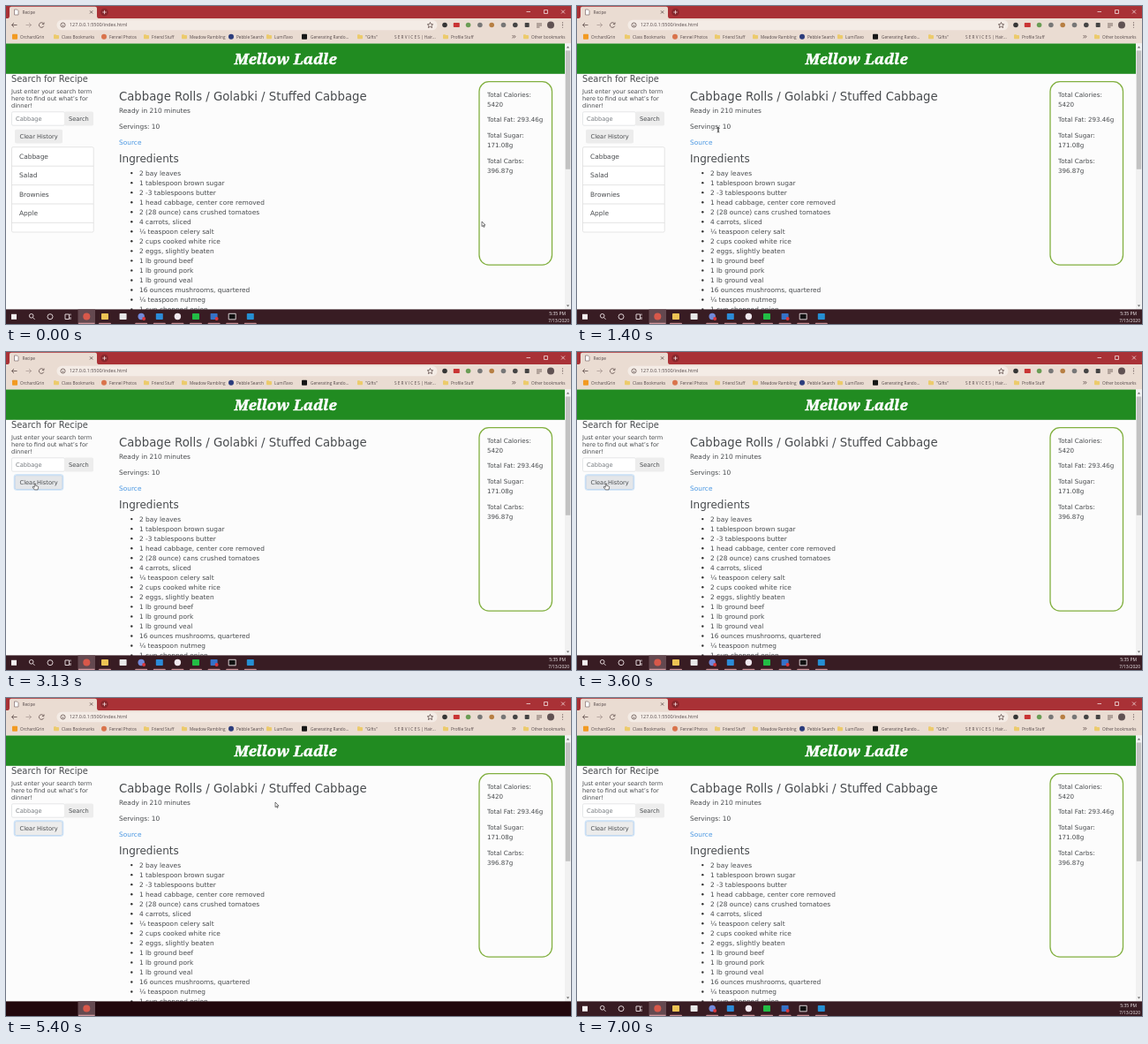
Animation of 640x360 px, one loop 7060 ms. Source, as an HTML page:

```html
<!DOCTYPE html>
<html lang="en">
<head>
<meta charset="utf-8">
<title>Recipe</title>
<style>
  html, body { margin: 0; width: 100%; height: 100%; overflow: hidden; background: #fcfcfc; }
  svg { display: block; width: 640px; height: 360px; }
  text { font-family: "DejaVu Sans", Inter, sans-serif; fill: #484b4e; white-space: pre; }
  .body { font-size: 7.42px; }
  .small { font-size: 6.65px; }
  .fact { font-size: 7.1px; }
  .title { font-size: 13.25px; }
  .sub { font-size: 12px; }
  .side { font-size: 9.9px; }
  .brand { font: italic 700 17px "Noto Serif", serif; fill: #fff; stroke: #fff; stroke-width: .5; stroke-linejoin: round; }
  .ui text { font-family: "Open Sans", "Noto Sans", sans-serif; font-size: 4.7px; fill: #55494a; }
  .ui .url { font-size: 5.4px; }
  .ui .clock { fill: #f4eef0; font-size: 5px; text-anchor: end; }
  .line { fill: none; stroke: #6d5c59; stroke-width: .9; }
  .tray { fill: none; stroke: #f0e6e8; stroke-width: .9; }
</style>
</head>
<body>
<svg viewBox="0 0 640 360">
  <rect width="640" height="360" fill="#fcfcfc"/>

  <!-- page -->
  <rect y="42.3" width="633" height="34.5" fill="#218b21"/>
  <text class="brand" x="316.5" y="66" text-anchor="middle">Mellow Ladle</text>
  <g id="copy"></g>

  <rect x="6.5" y="119.8" width="60" height="15.4" rx="1.5" fill="#fff" stroke="#dfe1e3" stroke-width=".8"/>
  <rect x="66" y="119.5" width="33" height="16" rx="1.5" fill="#ededed"/>
  <text class="small" x="11" y="130" style="fill:#757a7f">Cabbage</text>
  <text class="small" x="71" y="130">Search</text>

  <rect id="glow" x="9.2" y="138.7" width="55.6" height="17.6" rx="2.3" fill="none"/>
  <rect id="clear" x="10" y="139.7" width="54" height="15.8" rx="1.8" fill="#ececec" stroke-width=".6"/>
  <text class="small" x="15.5" y="150">Clear History</text>

  <g id="history">
    <rect x="6.5" y="159.7" width="92.7" height="96.3" rx="1.5" fill="#fff" stroke="#dedede" stroke-width=".8"/>
    <path d="M6.5 181.2h92.7m-92.7 21.4h92.7m-92.7 21.4h92.7m-92.7 21.4h92.7" stroke="#dedede" stroke-width=".8"/>
  </g>

  <rect id="facts" x="536" y="85.7" width="82.5" height="207.4" rx="11" fill="#fcfcfc" stroke-width="1.3"/>
  <g id="totals"></g>

  <rect x="633" y="42.3" width="7" height="301.5" fill="#f1f1f1"/>
  <rect x="633.8" y="50.5" width="5.4" height="134.3" fill="#c2c2c2"/>
  <path d="M634.8 47.5l1.7-2 1.7 2zM634.8 338.5l1.7 2 1.7-2z" fill="#666"/>

  <!-- browser window -->
  <g class="ui">
    <rect width="640" height="14" fill="#a93136"/>
    <path d="M2 14q2 0 2-3V2.7q0-2 2-2H101q2 0 2 2V11q0 3 2 3z" fill="#eadcd2"/>
    <rect y="14" width="640" height="28.3" fill="#eadcd2"/>
    <path d="M9.500 4h3l1.500 1.500V10h-4.500z" fill="#fff" stroke="#6b5556" stroke-width=".6"/>
    <text x="18.500" y="8.700">Recipe</text>
    <path class="line" d="M95 5.300l3.200 3.200m0-3.200l-3.200 3.200"/>
    <circle cx="111.500" cy="7" r="4.300" fill="#86262b"/>
    <path d="M109.300 7h4.400m-2.200-2.200v4.400M589.500 6.500h4.500M609.500 4.500h4v4h-4zM629 4.500l4 4m0-4l-4 4" fill="none" stroke="#f1dddd" stroke-width=".8"/>
    <path class="line" d="M12.500 21.500h-6m2.500-2.500l-2.500 2.500 2.500 2.500M42.500 20a2.800 2.800 0 1 0 .3 2.500M43 18.500v2h-2"/>
    <path class="line" d="M22.500 21.500h6m-2.500-2.500l2.500 2.500-2.500 2.500" opacity=".45"/>
    <rect x="57.500" y="15.800" width="431" height="11.500" rx="5.700" fill="#f4ece6"/>
    <circle class="line" cx="64.500" cy="21.500" r="2.500"/>
    <path class="line" d="M64.500 21.200v1.700"/>
    <text class="url" x="72" y="23.300">127.0.0.1:5500/index.html</text>
    <path class="line" d="M480.500 18.500l1 2.100 2.200.2-1.700 1.500.6 2.300-2.100-1.200-2.100 1.200.6-2.300-1.700-1.500 2.200-.2z"/>
    <g id="tools"></g>
    <path class="line" d="M601 20h6m-6 2h6m-6 2h3.500"/>
    <circle cx="617" cy="21.500" r="4" fill="#605253"/>
    <path d="M630.500 18.500v.9m0 1.700v.9m0 1.700v.9" stroke="#5a4a4a" stroke-width="1.1"/>
    <g id="marks"></g>
    <path class="line" d="M573.500 33l1.500 1.700-1.500 1.700m2-3.400l1.500 1.700-1.500 1.700"/>
    <rect id="fade" y="14" width="640" height="28.300" fill="#fff4e6" opacity=".35"/>

    <!-- taskbar -->
    <rect id="bar" y="343.400" width="640" height="16.600"/>
    <rect x="81.500" y="343.400" width="19.500" height="16.600" fill="#644950"/>
    <circle cx="91.300" cy="351.500" r="4" fill="#d8584a"/>
    <path d="M82 359.300h18.500" stroke="#dba0a5" stroke-width="1.200"/>
    <g id="taskbar">
      <rect x="6" y="348.800" width="6" height="6" fill="#f4f0f1"/>
      <circle class="tray" cx="28.700" cy="350.800" r="2.300"/>
      <path class="tray" d="M30.500 352.700l2 2.100M67 349h4.500v5.500H67zm6-.5v2m0 1.500v3"/>
      <circle class="tray" cx="50" cy="351.700" r="3"/>
      <text class="clock" x="634" y="350">5:35 PM</text>
      <text class="clock" x="638" y="357.500">7/13/2020</text>
    </g>
  </g>

  <g id="arrow"><path d="M0 0v5.600l1.300-1.200.9 2 .9-.4-.9-1.900h1.800z" fill="#fff" stroke="#222" stroke-width=".6"/></g>
  <g id="beam"><path d="M-1.300-3q1.300 0 1.300.7v4.600q0 .7-1.300.7M1.300-3Q0-3 0-2.300v4.600q0 .7 1.300.7" fill="none" stroke="#222" stroke-width=".7"/></g>
  <g id="hand"><path d="M-.7 0q.7-.8 1.400 0v2.400l2.300.6q.8.3.6 1.300l-.6 2.600h-3.700l-2.100-2.800q0-1 1-.6l1.100.8z" fill="#fff" stroke="#222" stroke-width=".6"/></g>
</svg>

<script>
const LOOP = 7060, STEP = 200 / 3;
const $ = id => document.getElementById(id);

function add(parent, tag, attrs, text = '') {
  const el = document.createElementNS('http://www.w3.org/2000/svg', tag);
  for (const key in attrs) el.setAttribute(key, attrs[key]);
  el.textContent = text;
  $(parent).append(el);
}
const write = (parent, style, x, y, text) => add(parent, 'text', { class: style, x, y }, text);
const dot = (parent, cx, cy, r, fill) => add(parent, 'circle', { cx, cy, r, fill });
const box = (parent, x, y, width, height, fill) =>
  add(parent, 'rect', { x, y, width, height, rx: .7, fill });

// Page text
write('copy', 'side', 6, 86.2, 'Search for Recipe');
['Just enter your search term', 'here to find out what’s for', 'dinner!']
  .forEach((line, i) => write('copy', 'small', 6, 99.2 + i * 7.7, line));
write('copy', 'title', 128, 106.5, 'Cabbage Rolls / Golabki / Stuffed Cabbage');
write('copy', 'body', 128, 121.3, 'Ready in 210 minutes');
write('copy', 'body', 128, 138.9, 'Servings: 10');
add('copy', 'text', { class: 'body', x: 128, y: 156.6, style: 'fill:#4a97e2' }, 'Source');
write('copy', 'sub', 128, 177.2, 'Ingredients');

['2 bay leaves', '1 tablespoon brown sugar', '2 -3 tablespoons butter',
 '1 head cabbage, center core removed', '2 (28 ounce) cans crushed tomatoes',
 '4 carrots, sliced', '¼ teaspoon celery salt', '2 cups cooked white rice',
 '2 eggs, slightly beaten', '1 lb ground beef', '1 lb ground pork', '1 lb ground veal',
 '16 ounces mushrooms, quartered', '¼ teaspoon nutmeg', '1 cup chopped onion'
].forEach((item, i) => {
  const y = 191.5 + i * 11.03;
  dot('copy', 142.3, y - 2.4, 1.2, '#333');
  write('copy', 'body', 151, y, item);
});

['Cabbage', 'Salad', 'Brownies', 'Apple']
  .forEach((item, i) => write('history', 'body', 15, 173 + i * 21.4, item));

[[102.7, 'Total Calories:'], [113.6, '5420'], [131.1, 'Total Fat: 293.46g'],
 [149, 'Total Sugar:'], [159.8, '171.08g'], [177.5, 'Total Carbs:'], [188.5, '396.87g']
].forEach(([y, line]) => write('totals', 'fact', 545, y, line));

// Bookmarks: icon x, colour (none for a bare label), text x, label
const folder = '#eccb6c';
[[7, '#f29a22', 16, 'OrchardGrin'], [54, folder, 63, 'Class Bookmarks'],
 [108, '#d9734b', 117, 'Fennel Photos'], [156, folder, 165, 'Friend Stuff'],
 [199, folder, 208, 'Meadow Rambling'], [252, '#2b3c7c', 261, 'Pebble Search'],
 [295, folder, 304, 'LumiTavo'], [335, '#161616', 345, 'Generating Rando...'],
 [398, folder, 407, '"Gifts"'], [0, '', 440, 'S E R V I C E S | Hair...'],
 [495, folder, 504, 'Profile Stuff'], [586, folder, 595, 'Other bookmarks']
].forEach(([x, fill, tx, label]) => {
  if (fill === folder) {
    box('marks', x, 32.2, 3, 2, fill);
    box('marks', x, 33, 6, 4.2, fill);
  } else if (fill === '#161616' || fill === '#f29a22') box('marks', x, 31.7, 6, 6, fill);
  else if (fill) dot('marks', x + 3, 34.8, 3, fill);
  write('marks', '', tx, 36.5, label);
});

// Toolbar extensions
['#353535', '#c93434', '#6a9d55', '#777', '#b77f43', '#777', '#444'].forEach((fill, i) => {
  const x = 497 + i * 13.3;
  i === 1 ? box('tools', x - 3.5, 19, 7, 5, fill) : dot('tools', x, 21.5, 2.8, fill);
});
box('tools', 587.7, 19, 5, 5, '#444');

// Running apps
['#edc354', '#e8e8e8', '#7289da', '#2b8bd8', '#f0e8ee', '#22bd45', '#3572c8', '#111', '#258fd3']
  .forEach((fill, i) => {
    const x = 112 + i * 20.6;
    i === 2 || i === 4 ? dot('taskbar', x, 351.5, 3.7, fill) : box('taskbar', x - 4, 348, 8, 7, fill);
    if (i === 7) add('taskbar', 'path', { class: 'tray', d: `M${x - 4} 348.300h8v6.500h-8z` });
    if (i === 2 || i === 6) dot('taskbar', x + 3, 354, 2, '#d9383d');
    if (i !== 1) box('taskbar', x - 7, 358.8, 14, 1.2, '#c98e94');
  });

// Pointer stops: time, x, y
const stops = [[0, 539, 244], [200, 530, 236], [1400, 160, 140], [2330, 17, 163], [2860, 33, 149],
  [3720, 33, 149], [4460, 253, 134], [5400, 305, 118], [5900, 318, 126], [6730, 600, 366], [LOOP, 600, 366]];

function pointer(t) {
  const i = Math.max(1, stops.findIndex(s => s[0] > t));
  const [t0, x0, y0] = stops[i - 1], [t1, x1, y1] = stops[i];
  const u = (t - t0) / (t1 - t0), k = u * u * (3 - 2 * u);
  return [x0 + (x1 - x0) * k, y0 + (y1 - y0) * k];
}

const show = (id, on) => $(id).style.display = on ? '' : 'none';
const paint = (id, attr, value) => $(id).setAttribute(attr, value);
const within = (t, a, b) => t >= a && t < b;

function draw() {
  const now = performance.now() % LOOP;
  const t = Math.floor((now + 8) / STEP) * STEP % LOOP;
  const [x, y] = pointer(t);

  const overButton = within(x, 10, 64) && within(y, 139, 156);
  const overText = within(x, 128, 172) && within(y, 132, 143);
  const shape = overButton ? 'hand' : overText ? 'beam' : 'arrow';
  for (const id of ['arrow', 'beam', 'hand']) show(id, id === shape);
  paint(shape, 'transform', `translate(${x.toFixed(2)} ${y.toFixed(2)})`);

  const cleared = t >= 3130, pale = within(t, 4430, 4525);
  const blank = within(t, 2300, 2395) || within(t, 5370, 5460);
  show('history', !cleared);
  show('glow', cleared);
  show('fade', pale);
  show('taskbar', !blank);
  paint('bar', 'fill', blank ? '#22080d' : '#381c23');
  paint('clear', 'fill', overButton ? '#e4e6e9' : '#ececec');
  paint('clear', 'stroke', !cleared ? 'none' : pale ? '#b5d0c6' : '#a3c8ec');
  paint('glow', 'stroke', pale ? '#d9ebe4' : '#cde3f8');
  paint('facts', 'stroke', pale ? '#9aab45' : '#82b040');
  requestAnimationFrame(draw);
}
draw();
</script>
</body>
</html>
```
